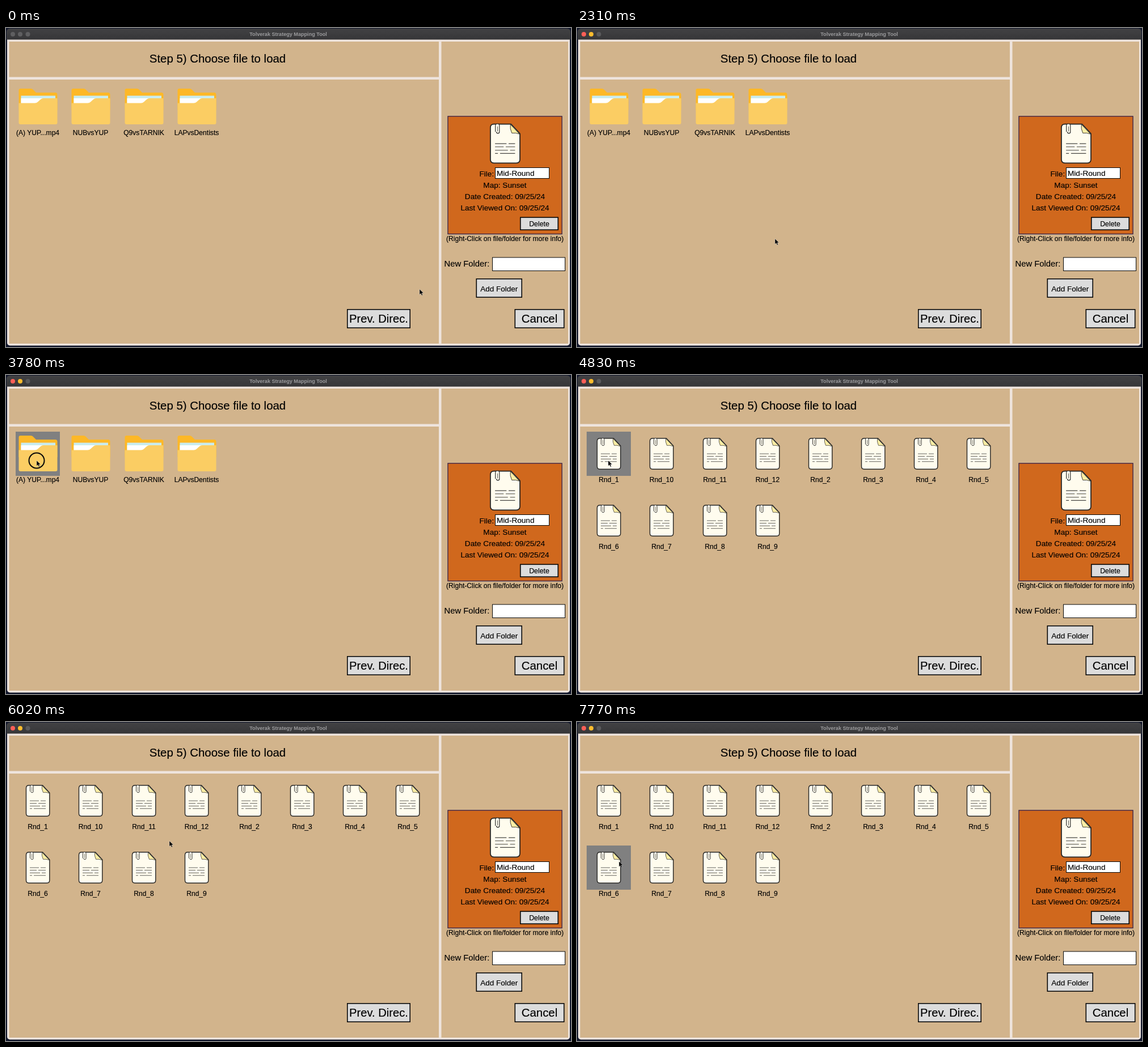
These frames come from a looping animation (996x563 px, 8 s). An HTML page:

```html
<!DOCTYPE html>
<html lang="en">
<head>
<meta charset="utf-8">
<title>Strategy Mapping Tool</title>
<style>
  html, body { margin: 0; width: 100%; height: 100%; overflow: hidden; background: #11162b; }
  svg { display: block; width: 996px; height: 563px; }
  text { font-family: "Liberation Sans", Arial, sans-serif; fill: #000; stroke: #000; stroke-width: .15px; }
  .caption { fill: #9c9c9e; stroke: none; font-weight: 700; }
</style>
</head>
<body>
<svg id="stage" viewBox="0 0 996 563">
  <defs>
    <linearGradient id="bar" x2="0" y2="1">
      <stop offset="0" stop-color="#424244"/><stop offset="1" stop-color="#363638"/>
    </linearGradient>
    <g id="folder">
      <path d="M5.500 26V10q0-3 3-3H27q2 0 3.500 1.500L36 14H70q3.500 0 3.500 3.500V45H5.500z" fill="#fdb827"/>
      <path d="M9.500 19.500H70V40H9.500z" fill="#c9ecee"/>
      <path d="M9.500 24H60V40H9.500z" fill="#fff"/>
      <path d="M5.500 32.500H34q3 0 5-2l5-4.500q2-2 5-2H73.500V67q0 3-3 3H8.500q-3 0-3-3z" fill="#fbcd63"/>
    </g>
    <g id="doc" fill="none" stroke="#262626" stroke-linejoin="round">
      <path d="M23.500 11.800H47.500L59.800 25V61.300q0 5-5 5H23.500q-5 0-5-5V16.800q0-5 5-5z" fill="#fffcee" stroke-width="1.400"/>
      <path d="M46.500 12.200L59.300 25.700Q54 23.500 48.500 24.300Q45.500 18 46.500 12.200z" fill="#fdeea4" stroke-width=".7"/>
      <path d="M25 39.100H41M44 39.100H53M25 43.600H37M40 43.600H53M25 48.300H43M46 48.300H53M25 52.800H29M32 52.800H53" stroke-width=".85" stroke-opacity=".85"/>
      <path d="M25.500 22.500V14a2.800 2.800 0 0 1 5.600 0V22.500a2.100 2.100 0 0 1-4.200 0" fill="#fffcee" stroke-width=".9"/>
      <path d="M28.500 22V15" stroke-width=".6"/>
    </g>
  </defs>
  <g id="window"></g>
  <rect id="hover" width="78" height="78" fill="#808080"/>
  <g id="folders"></g>
  <g id="files"></g>
  <circle id="ring" r="13.500" fill="none" stroke="#080808" stroke-width="2"/>
  <path id="cursor" d="M0 0V9.600L2.200 7.600L3.900 11L5.500 10.200L3.900 7L6.900 6.700z" fill="#050505" stroke="#fff" stroke-opacity=".6" stroke-width=".6"/>
</svg>
<script>
const $ = id => document.getElementById(id);
const LOOP = 8000, STEP = 70;
const CELL = { x: 17.3, y: 100, size: 78, dx: 93.15, dy: 118.2, cols: 8 };

const rect = (x, y, w, h, fill, line = 0, stroke = '#080808') =>
  `<rect x="${x + line / 2}" y="${y + line / 2}" width="${w - line}" height="${h - line}" fill="${fill}"` +
  (line ? ` stroke="${stroke}" stroke-width="${line}"/>` : '/>');
const label = (s, x, y, size, anchor = 'middle') =>
  `<text x="${x}" y="${y}" font-size="${size}" text-anchor="${anchor}">${s}</text>`;
const button = (s, x, y, w, h, size, base) =>
  rect(x, y, w, h, '#dcdcdc', 1.6) + label(s, x + w / 2, base, size);
const panel = (x, y, w, h) => rect(x, y, w, h, '#d2b48c');

$('window').innerHTML =
  `<rect x="2" y="10" width="992" height="550.500" rx="5" fill="#eee4dd"/>` +
  `<path d="M1 20.500V7q0-6 6-6H989q6 0 6 6V20.500z" fill="url(#bar)"/>` +
  panel(5.5, 24, 757.5, 62.5) + panel(5.5, 91, 757.5, 466) + panel(767.5, 24, 223.5, 533) +
  [12, 25, 38.5].map(x => `<circle class="light" cx="${x}" cy="11" r="4"/>`).join('') +
  `<text class="caption" x="497.500" y="14" font-size="9.100" text-anchor="middle">Tolverak Strategy Mapping Tool</text>` +
  label('Step 5) Choose file to load', 373, 61, 20.4) +
  rect(778.3, 155.2, 202.4, 209, '#d0681d', 1.3, '#35204a') +
  `<use href="#doc" transform="translate(880 204) scale(1.260) translate(-39.200 -39)"/>` +
  label('File:', 834.5, 261.7, 13.6, 'start') +
  rect(862, 246, 96, 20, '#fff', 1) +
  label('Mid-Round', 865, 261, 13.6, 'start') +
  label('Map: Sunset', 879.5, 282, 13.6) +
  label('Date Created: 09/25/24', 879.5, 302, 13.6) +
  label('Last Viewed On: 09/25/24', 879.5, 322.3, 13.6) +
  button('Delete', 906, 333.5, 68, 23.5, 12.3, 349.7) +
  label('(Right-Click on file/folder for more info)', 879.5, 376, 12.1) +
  label('New Folder:', 772.5, 420.5, 14.8, 'start') +
  rect(857, 404.5, 129, 24.5, '#fff', 1) +
  button('Add Folder', 828.5, 442, 81.5, 34, 13.5, 464.5) +
  button('Prev. Direc.', 601, 496, 112, 34, 20.2, 520.3) +
  button('Cancel', 896.5, 496, 88, 34, 20.4, 520.3);

const place = i => [
  Math.round(CELL.x + CELL.dx * (i % CELL.cols)),
  Math.round(CELL.y + CELL.dy * Math.floor(i / CELL.cols))
];
const grid = (names, icon) => names.map((name, i) => {
  const [x, y] = place(i);
  return `<use href="#${icon}" x="${x}" y="${y}"/>` + label(name, x + 39, y + 88.7, 12.1);
}).join('');

const folders = ['(A) YUP...mp4', 'NUBvsYUP', 'Q9vsTARNIK', 'LAPvsDentists'];
const files = [1, 10, 11, 12, 2, 3, 4, 5, 6, 7, 8, 9].map(n => 'Rnd_' + n);
$('folders').innerHTML = grid(folders, 'folder');
$('files').innerHTML = grid(files, 'doc');

const smooth = p => p * p * (3 - 2 * p);
const out = p => 1 - (1 - p) ** 2;
const linear = p => p;

// Cursor legs: start, end, target x, target y, easing
const legs = [
  [1049, 1050, 728, 460, linear],
  [1610, 2310, 349, 372, smooth],
  [2450, 2800, 143, 269, smooth],
  [3010, 3080, 118, 251, linear],
  [3080, 3570, 54, 151, out],
  [4760, 4830, 55, 151, linear],
  [4830, 5600, 254, 201, smooth],
  [5600, 5880, 288, 210, out],
  [6020, 6790, 83, 241, smooth],
  [6790, 6930, 74, 247, out],
  [7000, 7070, 74, 246, linear]
];

function cursorAt(t) {
  let x = 729, y = 461;
  for (const [from, to, tx, ty, ease] of legs) {
    if (t <= from) break;
    const p = ease(Math.min(1, (t - from) / (to - from)));
    x += (tx - x) * p;
    y += (ty - y) * p;
  }
  return [x, y];
}

function cellAt(x, y, count) {
  for (let i = 0; i < count; i++) {
    const [cx, cy] = place(i);
    if (x >= cx && x < cx + CELL.size && y >= cy && y < cy + CELL.size) return i;
  }
  return -1;
}

const show = (id, on) => $(id).setAttribute('visibility', on ? 'visible' : 'hidden');
const move = (id, x, y) => $(id).setAttribute('transform', `translate(${x} ${y})`);
const lights = document.querySelectorAll('.light');

function draw(now) {
  const t = Math.floor(now % LOOP / STEP) * STEP;
  const opened = t >= 3850;
  const [x, y] = cursorAt(t);
  const cell = cellAt(x, y, opened ? files.length : folders.length);

  const colors = t >= 770 ? ['#fe5f57', '#febc2e', '#5a5a5c'] : ['#5f5f61', '#5f5f61', '#5f5f61'];
  lights.forEach((light, i) => light.setAttribute('fill', colors[i]));
  show('folders', !opened);
  show('files', opened);
  show('hover', cell >= 0);
  if (cell >= 0) move('hover', ...place(cell));
  show('ring', [3780, 7560].some(click => t >= click && t < click + 140));
  move('ring', x, y);
  move('cursor', x, y);
  requestAnimationFrame(draw);
}
requestAnimationFrame(draw);
</script>
</body>
</html>
```
